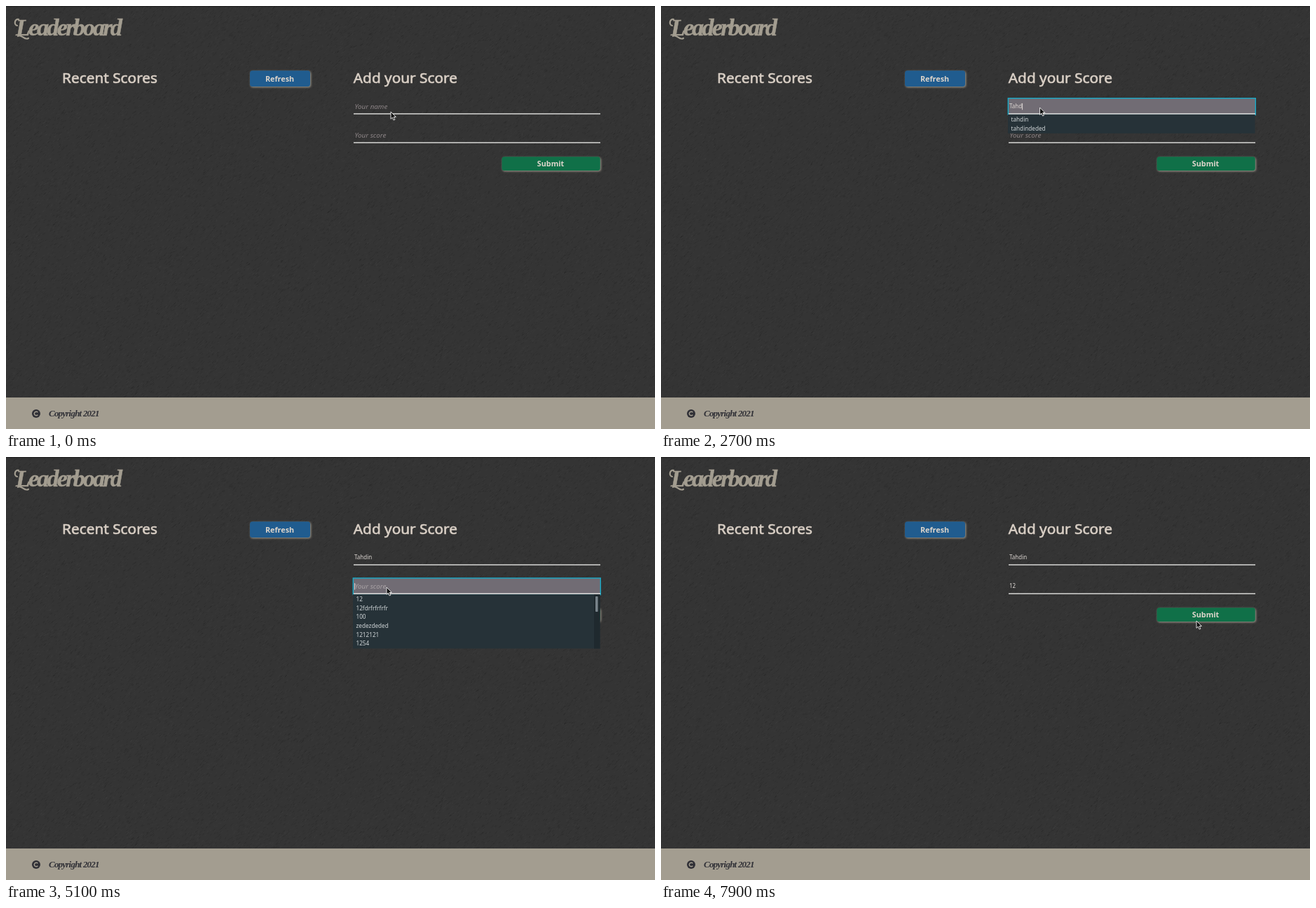
Write an HTML page with a canvas that moves like this. It is 926 px wide and 604 px high and loops after 8 s.

```html
<!DOCTYPE html>
<html lang="en">
<head>
<meta charset="utf-8">
<title>Leaderboard</title>
<style>
  html, body { margin: 0; width: 100%; height: 100%; overflow: hidden; background: #333; }
  canvas, svg { position: absolute; left: 0; top: 0; display: block; }
  text { font-family: "Noto Sans", "Open Sans", sans-serif; white-space: pre; }
  .script { font-family: "Liberation Serif", serif; font-weight: 700; font-style: italic; }
  .head { font-size: 20.8px; fill: #d9cfc5; stroke: #d9cfc5; stroke-width: .65; }
  .btn { font-size: 10.8px; font-weight: 700; fill: #ddd5cb; text-anchor: middle; }
  .glow { filter: drop-shadow(1px 1px 1.5px #a39d90); }
  .hint { font-size: 9.8px; font-style: italic; fill: #8c8486; }
  .hint.on { fill: #aaa3a6; }
  .typed { font-size: 8px; fill: #dcd6d2; }
  .item { font-size: 8.2px; fill: #d0d5d7; }
</style>
</head>
<body>
<canvas id="cloth" width="926" height="604"></canvas>
<svg width="926" height="604" viewBox="0 0 926 604">
  <rect width="926" height="1.5" opacity=".25"/>
  <g fill="#a39d90" stroke="#a39d90">
    <text class="script" x="14" y="41.8" font-size="34" letter-spacing="-2.75" stroke-width=".5">Leaderboard</text>
    <path d="M18 19C12 18 11 27 16 28M17 43C22 39 26 50 32 46" fill="none" stroke-width="2.2" stroke-linecap="round"/>
  </g>
  <text class="head" x="80" y="110">Recent Scores</text>
  <text class="head" x="495.8" y="110">Add your Score</text>
  <rect class="glow" x="348" y="92.3" width="86" height="22.7" rx="3.5" fill="#205c8f"/>
  <text class="btn" x="390.5" y="107.8">Refresh</text>
  <rect class="glow" x="707.5" y="215.2" width="140.3" height="19.8" rx="3.5" fill="#107048"/>
  <text class="btn" x="777" y="229">Submit</text>
  <rect y="559" width="926" height="45" fill="#a39d90"/>
  <circle cx="43" cy="582" r="6" fill="#303036"/>
  <path d="M45.3 580.2A2.8 2.8 0 1 0 45.3 583.8" fill="none" stroke="#a39d90" stroke-width="1.5"/>
  <text class="script" x="61" y="586.3" font-size="13" letter-spacing="-.78" fill="#303036">Copyright 2021</text>
  <g id="live"></g>
</svg>
<script>
const LOOP = 8000;
const live = document.getElementById('live');
const ctx = document.getElementById('cloth').getContext('2d');

// Dark woven cloth: seeded short diagonal threads
function weave() {
  let seed = 7;
  const rnd = () => (seed = (seed * 16807) % 2147483647) / 2147483647;
  ctx.fillStyle = '#343434';
  ctx.fillRect(0, 0, 926, 604);
  ctx.lineWidth = 0.8;
  for (let i = 0; i < 40000; i++) {
    const x = rnd() * 934 - 4, y = rnd() * 570, len = 1 + rnd() * 2;
    ctx.strokeStyle = i % 2 ? 'rgba(0,0,0,.14)' : 'rgba(255,255,255,.03)';
    ctx.beginPath();
    ctx.moveTo(x, y);
    ctx.lineTo(x + len, y - len);
    ctx.stroke();
  }
}

const names = ['tahdin', 'tahdindeded', 'tezded'];
const allScores = ['12', '12fdrfrfrfrfr', '100', 'zedezdeded', '1212121', '1254'];
const with1 = ['12', '12fdrfrfrfrfr', '100', '1212121', '1254', '12zszszs'];
const with12 = ['12', '12fdrfrfrfrfr', '1212121', '1254', '12zszszs', '125'];
const arrow = (x, y) => ({ kind: 'arrow', x, y });
const beam = (x, y) => ({ kind: 'beam', x, y });

// Each step changes part of the state at the given time
const steps = [
  [0, { name: '', score: '', focus: '', list: [], thumb: 22, caret: true, ptr: arrow(549, 151) }],
  [400, { ptr: arrow(548, 150) }],
  [500, { ptr: beam(544, 147) }],
  [600, { ptr: beam(541, 146) }],
  [800, { focus: 'name' }],
  [1900, { name: 'T' }],
  [2000, { list: names }],
  [2100, { ptr: arrow(540.5, 145) }],
  [2300, { name: 'Ta', list: names.slice(0, 2) }],
  [2600, { name: 'Tah' }],
  [2700, { name: 'Tahd' }],
  [4100, { name: 'Tahdi', ptr: arrow(543, 170) }],
  [4200, { name: 'Tahdin', ptr: arrow(545, 188) }],
  [4400, { list: [] }],
  [4500, { focus: 'score', ptr: beam(545, 189) }],
  [4700, { ptr: beam(544, 188) }],
  [4800, { ptr: beam(543, 187) }],
  [5000, { list: allScores }],
  [5100, { ptr: arrow(543, 186) }],
  [5300, { ptr: null }],
  [5600, { caret: false }],
  [5900, { score: '1', list: with1, caret: true }],
  [6000, { score: '12', list: with12, thumb: 24 }],
  [6800, { ptr: arrow(543, 186) }],
  [6900, { ptr: arrow(517, 192) }],
  [7000, { ptr: arrow(470, 200), caret: false }],
  [7100, { ptr: arrow(442, 203) }],
  [7300, { list: [] }],
  [7400, { focus: '', ptr: arrow(450, 204) }],
  [7500, { ptr: arrow(500, 210) }],
  [7600, { ptr: arrow(585, 219) }],
  [7700, { ptr: arrow(680, 228) }],
  [7800, { ptr: arrow(742, 233) }],
  [7900, { ptr: arrow(764, 234) }]
];

const rect = (x, y, w, h, fill, more = '') =>
  `<rect x="${x}" y="${y}" width="${w}" height="${h}" fill="${fill}" ${more}/>`;
const label = (cls, x, y, s) => `<text class="${cls}" x="${x}" y="${y}">${s}</text>`;

function field(top, value, hint, on, caret) {
  let out = on ? rect(495.3, top, 353, 23.8, '#716c74', 'stroke="#17a9c6" stroke-width="1.4"') : '';
  out += value
    ? label('typed', 497, top + 14.3, value)
    : label('hint' + (on ? ' on' : ''), 497.5, top + 14.9, hint);
  if (on && caret) {
    ctx.font = '8px "Noto Sans", "Open Sans", sans-serif';
    out += rect(497 + ctx.measureText(value).width, top + 7.2, 0.9, 9.4, '#e2dcda');
  }
  return out + rect(496, top + 21.6, 352, 1.3, '#efefed');
}

function dropdown(top, list, thumb) {
  if (!list.length) return '';
  const h = 12.6 * list.length + 1.8;
  let out = rect(495, top, 352.5, h, '#263238');
  list.forEach((s, i) => { out += label('item', 499.5, top + 10.2 + i * 12.55, s); });
  if (list.length > 5) {
    out += rect(839, top, 8.5, h, '#1f292e') + rect(841, top + 3, 3.6, thumb, '#78838a', 'rx="1"');
  }
  return out;
}

function pointer(p) {
  if (!p) return '';
  const shape = p.kind === 'arrow'
    ? '<path d="M0 0V10.3L2.4 8.2L4.1 12L5.9 11.2L4.2 7.5H7.4Z" fill="#111" stroke="#f2f2f2" stroke-width=".9"/>'
    : ['#f0f0f0" stroke-width="2.2', '#222" stroke-width=".9'].map(s =>
        `<path d="M-2.4-5.4H-.6L0-4.8L.6-5.4H2.4M0-4.8V4.8M-2.4 5.4H-.6L0 4.8L.6 5.4H2.4" fill="none" stroke="${s}"/>`).join('');
  return `<g transform="translate(${p.x} ${p.y})">${shape}</g>`;
}

let shown = -1;
function draw(t) {
  const count = steps.filter(s => s[0] <= t).length;
  if (count === shown) return;
  shown = count;
  const s = Object.assign({}, ...steps.slice(0, count).map(x => x[1]));
  const onName = s.focus === 'name';
  live.innerHTML =
    field(131.7, s.name, 'Your name', onName, s.caret) +
    field(172.9, s.score, 'Your score', s.focus === 'score', s.caret) +
    dropdown(onName ? 154.9 : 196.1, s.list, s.thumb) +
    pointer(s.ptr);
}

weave();
const start = performance.now();
function tick() {
  draw((performance.now() - start) % LOOP);
  requestAnimationFrame(tick);
}
tick();
</script>
</body>
</html>
```
